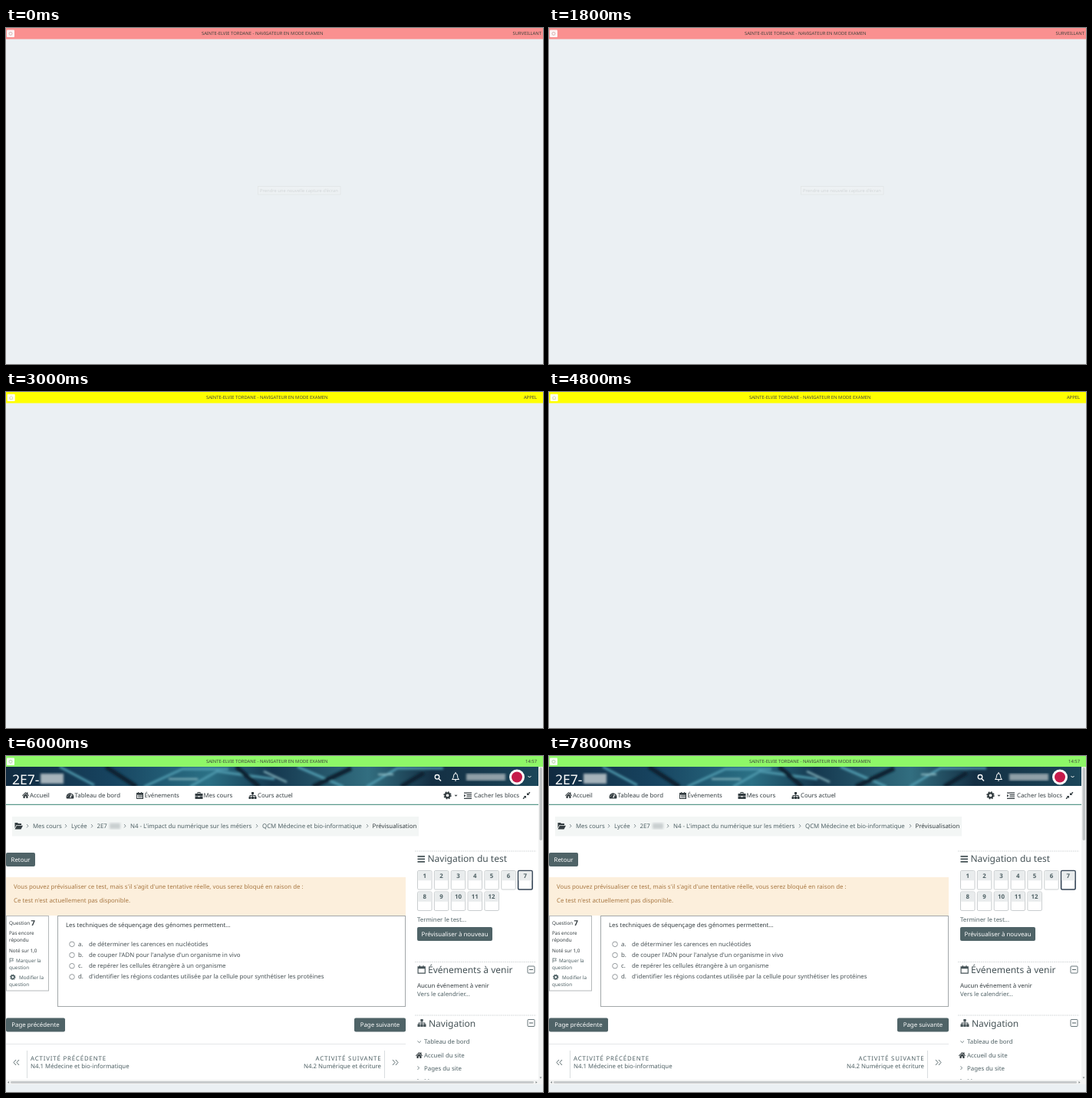
An HTML page that plays this animation: 700 by 438 pixels, repeating every 9 s.

```html
<!DOCTYPE html>
<html lang="fr">
<meta charset="utf-8">
<style>
html, body { margin: 0; width: 100%; height: 100%; overflow: hidden; background: #ebf0f3 }
svg { display: block; width: 700px; height: 438px; font: 7.85px "Noto Sans", sans-serif; fill: #4e6064; text-rendering: geometricPrecision; white-space: pre }
.scene { display: none }
.bar { font-size: 5.85px; fill: #40423c }
.end { text-anchor: end }
.mid { text-anchor: middle }
.dark { fill: #343d41 }
.white { fill: #fff }
.title { font-size: 12px; fill: #465357 }
.small { font-size: 6.35px }
.caps { letter-spacing: .84px }
.line { fill: none; stroke: #4e6064 }
.box { fill: #fff; stroke: #b5b9bb }
.button { fill: #4f6367 }
</style>
<svg viewBox="0 0 700 438">
  <defs>
    <linearGradient id="photo">
      <stop offset="0" stop-color="#102a40"/><stop offset=".2" stop-color="#174460"/>
      <stop offset=".38" stop-color="#2b7085"/><stop offset=".5" stop-color="#15384f"/>
      <stop offset=".68" stop-color="#326e80"/><stop offset=".8" stop-color="#142f43"/>
      <stop offset="1" stop-color="#1b4659"/>
    </linearGradient>
    <filter id="blur"><feGaussianBlur stdDeviation="1.6"/></filter>
    <clipPath id="banner"><path d="M0 14H694V39H0Z"/></clipPath>
    <clipPath id="page"><path d="M0 14H694V422H0Z"/></clipPath>
    <path id="house" d="M0 4.5 4.5 0 6 1.5V.5H7.5V3L9 4.5 8.4 5.2 4.5 1.5.6 5.2ZM1.5 5 4.5 2.3 7.5 5V8H5.3V5.5H3.7V8H1.5Z"/>
    <path id="calendar" fill-rule="evenodd" d="M0 1H2V0H3V1H6V0H7V1H9V9H0ZM1 3.5V8H8V3.5Z"/>
    <path id="tree" d="M3.5 0H6.5V3H5.4V4H9V6H10V9H7V6H8V5H5.4V6H6.5V9H3.5V6H4.6V5H2V6H3V9H0V6H1V4H4.6V3H3.5Z"/>
    <g id="gear"><circle r="3" fill="none" stroke="currentColor" stroke-width="2.2"/><circle r="4.4" fill="none" stroke="currentColor" stroke-width="1.6" stroke-dasharray="1.73"/></g>
    <path id="chevron" d="M0 0 2 2.2 0 4.4" fill="none" stroke="currentColor" stroke-width=".8"/>
    <g id="fold"><rect width="9" height="9" rx="1" fill="#fff" stroke="#59686c" stroke-width=".9"/><path d="M2 4.5H7" stroke="#59686c" stroke-width="1.1"/></g>
  </defs>

  <g class="scene">
    <path fill="#fa9090" d="M0 0H700V14.4H0Z"/>
    <g class="bar">
      <text class="end" x="413.4" y="9.3">SAINTE-ELVIE TORDANE - NAVIGATEUR EN MODE EXAMEN</text>
      <text class="end" x="698" y="9.3">SURVEILLANT</text>
    </g>
    <rect x="1" y="2.5" width="10" height="9.5" rx="1" fill="#fdf5f5"/>
    <circle cx="6" cy="7.3" r="2" fill="none" stroke="#d1a5a5" stroke-width=".8"/>
    <rect x="328.5" y="206.5" width="107.5" height="10.5" fill="#edf1f3" stroke="#e1e5e7" stroke-width=".8"/>
    <text x="331" y="213.8" font-size="5.8" fill="#d2d6d8">Prendre une nouvelle capture d'écran</text>
  </g>

  <g class="scene">
    <path fill="#ff0" d="M0 0H700V14.4H0Z"/>
    <g class="bar">
      <text class="end" x="419.4" y="9.3">SAINTE-ELVIE TORDANE - NAVIGATEUR EN MODE EXAMEN</text>
      <text class="end" x="692" y="9.3">APPEL</text>
    </g>
    <rect x="1.7" y="2.7" width="10" height="9.3" rx="1" fill="#fffff0"/>
    <path d="M4.3 7.5 6.7 5.3 9.1 7.5M5 7.2V9.4H8.4V7.2" fill="none" stroke="#c9c9a2" stroke-width=".7"/>
  </g>

  <g class="scene">
    <path fill="#fff" d="M0 14H700V428H0Z"/>
    <path fill="#8ef868" d="M0 0H700V14.4H0Z"/>
    <g class="bar">
      <text class="end" x="419.4" y="9.3">SAINTE-ELVIE TORDANE - NAVIGATEUR EN MODE EXAMEN</text>
      <text class="end" x="692" y="9.3">14:57</text>
    </g>
    <rect x="1" y="2.5" width="10" height="9.5" rx="1" fill="#f4fff0"/>
    <circle cx="6" cy="7.3" r="2" fill="none" stroke="#a9c79e" stroke-width=".8"/>

    <g clip-path="url(#banner)">
      <path fill="url(#photo)" d="M0 14H694V40H0Z"/>
      <g fill="none" filter="url(#blur)">
        <path stroke="#4f9aae" stroke-width="3" d="M70 14 115 38M180 40 230 17H290M240 40 275 20 350 30M380 14 440 40M470 40 510 16H570"/>
        <path stroke="#0b2032" stroke-width="6" d="M130 14 170 40M300 14 330 40M400 40 450 16M515 40 545 22"/>
        <path stroke="#8dbcc5" stroke-width="2" d="M212 30H250M336 20 366 34M485 24H505"/>
      </g>
      <path fill="#a6b3bb" filter="url(#blur)" d="M45 23H75V36H45Z"/>
      <path fill="#aeb9be" filter="url(#blur)" opacity=".8" d="M600 23H651V32H600Z"/>
    </g>
    <text class="white" x="8" y="36.5" font-size="17.5">2E7-</text>
    <path fill="none" stroke="#fff" stroke-width="1.4" d="M564 29.5 567 32.5"/>
    <circle cx="562" cy="27.3" r="2.8" fill="none" stroke="#fff" stroke-width="1.3"/>
    <path fill="none" stroke="#fff" d="M581.5 30.5Q583.5 29 583.5 26T586 22.8 588.5 26 590.5 30.5ZM585 32H587M586 21V23"/>
    <circle cx="666" cy="27.5" r="10" fill="#fff"/>
    <circle cx="666" cy="27.5" r="7" fill="#c51a4a"/>
    <path fill="none" stroke="#fff" d="M680.5 26 682.5 28 684.5 26"/>

    <path fill="#5b9a8c" d="M0 62.7H694V64H0Z"/>
    <g class="dark">
      <use href="#house" x="21" y="47"/>
      <text x="31" y="54">Accueil</text>
      <path fill-rule="evenodd" d="M79 55.5A5 5 0 1 1 88 55.5ZM83 54 85.5 49.5 86 50 84.5 54.5Z"/>
      <path stroke="#fff" stroke-width=".8" stroke-dasharray="1 1.5" fill="none" d="M80 53A3.6 3.6 0 0 1 87 53"/>
      <text x="89.5" y="54">Tableau de bord</text>
      <use href="#calendar" x="170" y="47"/><path d="M172 51H178M172 53H178M173 50V55M175 50V55M177 50V55" stroke="#343d41" stroke-width=".6"/>
      <text x="180.5" y="54">Événements</text>
      <path fill-rule="evenodd" d="M246.5 49H249.5V47H253.5V49H256.5V52H246.5ZM250.3 48V49H252.7V48ZM246.5 52.6H250.5V53.4H252.5V52.6H256.5V56H246.5Z"/>
      <text x="257.5" y="54">Mes cours</text>
      <use href="#tree" x="316.5" y="47"/>
      <text x="328" y="54">Cours actuel</text>
      <use href="#gear" x="575.5" y="51.3" color="#343d41"/>
      <path d="M584.5 50.7H588.5L586.5 52.8Z"/>
      <path d="M597 47.5H607V48.7H597ZM600.5 50H607V51.2H600.5ZM600.5 52.4H607V53.6H600.5ZM597 54.8H607V56H597ZM597 50V53.5L599.4 51.7Z"/>
      <text x="610" y="54">Cacher les blocs</text>
      <path d="M679 51V47.8L680.2 49 682.4 46.8 683.4 47.8 681.2 50 682.3 51ZM678 52V55.2L676.8 54 674.6 56.2 673.6 55.2 675.8 53 674.7 52Z"/>
    </g>

    <path fill="#f3f6f5" d="M8 79H538V104.500H8Z"/>
    <path class="dark" d="M11.500 87H15L16 88H20V90H13.500L11.500 94ZM14 90.700H22L19.500 95.500H11.500Z"/>
    <g id="crumbs">
      <text x="35" y="94">Mes cours</text><text x="85" y="94">Lycée</text><text x="118.500" y="94">2E7</text>
      <text x="162" y="94">N4 - L'impact du numérique sur les métiers</text>
      <text x="334" y="94">QCM Médecine et bio-informatique</text>
      <text class="dark" x="477.500" y="94">Prévisualisation</text>
    </g>
    <path fill="#c9cfd0" filter="url(#blur)" d="M135 87.500H149V95H135Z"/>

    <path fill="#fcefdc" d="M0 158H521V208H0Z"/>
    <g fill="#a87843">
      <text x="10" y="172.500">Vous pouvez prévisualiser ce test, mais s'il s'agit d'une tentative réelle, vous serez bloqué en raison de :</text>
      <text x="10" y="191">Ce test n'est actuellement pas disponible.</text>
    </g>

    <rect class="box" x=".5" y="208.500" width="55" height="97.500"/>
    <g class="small dark">
      <text x="4" y="220">Question</text><text x="32.500" y="220.500" font-size="9.500" font-weight="600">7</text>
      <text x="4" y="233">Pas encore</text><text x="4" y="242">répondu</text>
      <text x="4" y="255.500">Noté sur 1,0</text>
    </g>
    <g class="small">
      <path class="line" stroke-width=".7" d="M5 263.500V269.500M5 264H9.500L8.500 265.500 9.500 267H5"/>
      <text x="13" y="268.800">Marquer la</text><text x="4" y="277.500">question</text>
      <use href="#gear" transform="translate(8.800 288.300) scale(.72)" color="#4e6064"/>
      <text x="17" y="291.300">Modifier la</text><text x="4" y="300">question</text>
    </g>

    <rect x="67.500" y="208.500" width="453" height="118" fill="#fff" stroke="#a2a7a9"/>
    <text class="dark" x="78" y="223">Les techniques de séquençage des génomes permettent...</text>
    <g id="answers" fill="#465054"></g>

    <path stroke="#e4e7e8" d="M0 375.500H521"/>
    <path stroke="#d9dddf" d="M27.500 384V420M493.500 384V420"/>
    <path class="line" stroke-width=".9" d="M13 396 10 399.500 13 403M17 396 14 399.500 17 403M504 396 507 399.500 504 403M508 396 511 399.500 508 403"/>
    <text class="caps" x="32" y="397">ACTIVITÉ PRÉCÉDENTE</text>
    <text x="32" y="407">N4.1 Médecine et bio-informatique</text>
    <text class="caps end" x="489.500" y="397">ACTIVITÉ SUIVANTE</text>
    <text class="end" x="489" y="407">N4.2 Numérique et écriture</text>

    <path stroke="#c5cacc" stroke-dasharray="1.500 1" stroke-width=".8" d="M533 124H691M533 268.500H691M533 338H691"/>
    <g class="title">
      <path d="M536.500 130H546V131.700H536.500ZM536.500 133.500H546V135.200H536.500ZM536.500 137H546V138.700H536.500Z"/>
      <text x="549.500" y="138">Navigation du test</text>
      <use href="#calendar" transform="translate(536.500 273) scale(1.150 1.200)"/>
      <text x="550" y="283">Événements à venir</text>
      <use href="#tree" transform="translate(536.500 343) scale(1.100)"/>
      <text x="551" y="352.500">Navigation</text>
    </g>
    <use href="#fold" x="680" y="274"/><use href="#fold" x="680" y="343.500"/>
    <g id="cells" class="mid" font-weight="600"></g>
    <text x="536" y="216">Terminer le test...</text>
    <text class="dark" x="536" y="302">Aucun événement à venir</text>
    <text x="536" y="313">Vers le calendrier...</text>

    <g clip-path="url(#page)">
      <path class="line" stroke-width=".8" d="M536.500 371.500 538.700 373.700 540.900 371.500"/>
      <text x="545" y="375">Tableau de bord</text>
      <use class="dark" href="#house" x="534" y="386"/><text x="545" y="393">Accueil du site</text>
      <use href="#chevron" x="536.500" y="404.500" color="#4e6064"/><text x="545" y="409.500">Pages du site</text>
      <use href="#chevron" x="536.500" y="421" color="#4e6064"/><text x="545" y="426.500">Mes cours</text>
    </g>
    <g id="buttons"></g>

    <path fill="#f2f3f3" d="M694 14.400H700V428H0V422H694Z"/>
    <rect x="695.500" y="15" width="3.500" height="95" rx="1.700" fill="#bfc3c4"/>
    <rect x="6" y="424" width="682" height="2.800" rx="1.400" fill="#c5c8c9"/>
    <path fill="#7c8384" d="M2 425.400 4 424V426.800ZM692.500 425.400 690.500 424V426.800ZM697 420.500 695.600 418.500H698.400Z"/>
  </g>
</svg>
<script>
const add = (id, markup) => document.getElementById(id).insertAdjacentHTML('beforeend', markup);

[27, 77, 111, 154, 326, 470].forEach(x => add('crumbs', `<use href="#chevron" x="${x}" y="89" color="#69777b"/>`));

['de déterminer les carences en nucléotides',
 "de couper l'ADN pour l'analyse d'un organisme in vivo",
 'de repérer les cellules étrangère à un organisme',
 "d'identifier les régions codantes utilisée par la cellule pour synthétiser les protéines"
].forEach((answer, i) => {
  const y = 247.8 + i * 14.2;
  add('answers', `<circle cx="86" cy="${y - 2.5}" r="3.3" fill="#fff" stroke="#7e8588" stroke-width=".8"/>
    <text x="94" y="${y}">${'abcd'[i]}.</text><text x="108" y="${y}">${answer}</text>`);
});

for (let i = 0; i < 12; i++) {
  const x = 536.5 + i % 7 * 21.85, y = i < 7 ? 149.5 : 177;
  const border = i == 6 ? 'stroke="#344456" stroke-width="1.6"' : 'stroke="#c3c8ca" stroke-width=".9"';
  add('cells', `<rect x="${x}" y="${y}" width="18.5" height="24.5" rx="1.5" fill="#fff" ${border}/>
    <path fill="#e9eced" d="M${x + .8} ${y + .8}h16.900v12h-16.900z"/>
    <text x="${x + 9.2}" y="${y + 9.2}">${i + 1}</text>`);
}

[[0, 126, 38, 'Retour'], [0, 341.5, 77, 'Page précédente'], [454, 341.5, 67, 'Page suivante'],
 [536, 223, 98, 'Prévisualiser à nouveau']
].forEach(([x, y, width, label]) => add('buttons',
  `<rect class="button" x="${x}" y="${y}" width="${width}" height="18" rx="2"/>
   <text class="white mid" x="${x + width / 2}" y="${y + 11.5}">${label}</text>`));

const scenes = document.querySelectorAll('.scene');
function draw() {
  const current = Math.floor(performance.now() / 3000) % 3;
  scenes.forEach((scene, i) => scene.style.display = i == current ? 'inline' : 'none');
  requestAnimationFrame(draw);
}
draw();
</script>
</html>
```
